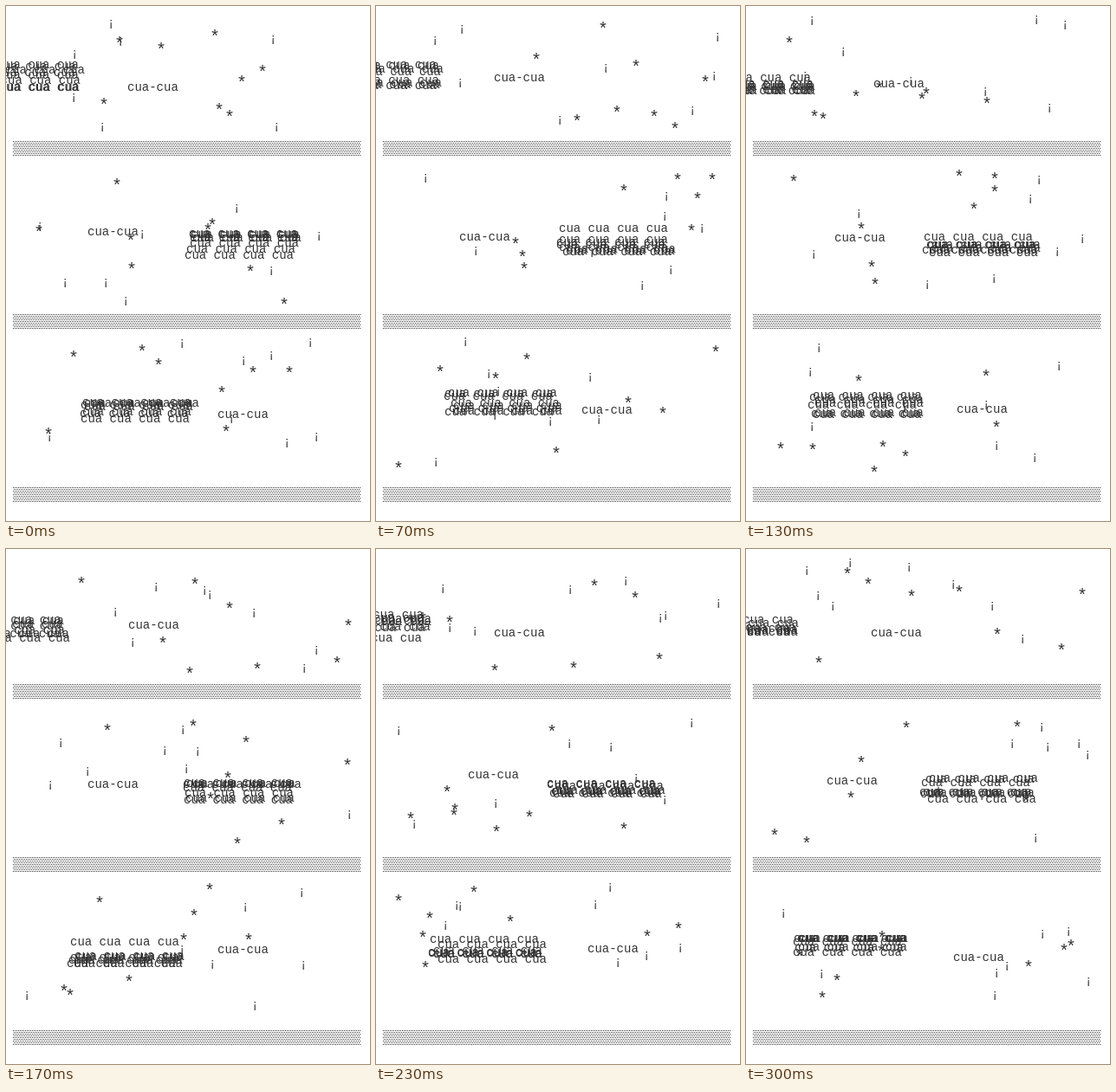
Recreate the animation shown at these times as an HTML page with a canvas. Size 420 by 595 pixels, loop 0.33 s.

```html
<!DOCTYPE html>
<html lang="ca">
<meta charset="utf-8">
<title>cua-cua</title>
<style>
  html, body { margin: 0; height: 100%; overflow: hidden; background: #fff; }
  canvas { display: block; }
</style>
<canvas width="420" height="595"></canvas>
<script>
const ctx = document.querySelector('canvas').getContext('2d');
const LOOP = 330, LANE = 200, ROWS = 8, SPARKS = 8;
const INK = '#333';

// Home of the caller and of the flock, and the flock's drift to the left per step
const LANES = [
  { callX: 134, callY: 83, flockX: -49, flockY: 66, drift: 3 },
  { callX: 92, callY: 60, flockX: 207, flockY: 53, drift: 1 },
  { callX: 231, callY: 60, flockX: 87, flockY: 45, drift: 4.5 },
];

function seeded(seed) {
  return () => {
    seed = seed + 0x6d2b79f5 | 0;
    let n = Math.imul(seed ^ seed >>> 15, seed | 1);
    n ^= n + Math.imul(n ^ n >>> 7, n | 61);
    return ((n ^ n >>> 14) >>> 0) / 2 ** 32;
  };
}

function drawLane(lane, index, step) {
  const random = seeded(step * 31 + index * 7 + 1);
  const within = (low, high) => low + random() * (high - low);
  const top = index * LANE;
  const put = (text, x, y, size = 14) => {
    ctx.font = `${size}px "Liberation Mono", monospace`;
    ctx.fillText(text, Math.round(x), Math.round(top + y));
  };

  const flockX = lane.flockX - lane.drift * step + within(-4, 4);
  const flockY = lane.flockY + within(0, 14);
  for (let row = 0; row < ROWS; row++) {
    put('cua cua cua cua', flockX + within(0, 13), flockY + within(4, 32));
  }
  put('cua-cua', lane.callX + within(0, 14), lane.callY + within(4, 18));

  const first = index ? -10 : 18;
  for (let i = 0; i < SPARKS; i++) {
    put('*', within(17, 395), within(first, 144) + 8, 20);
    put('¡', within(17, 395), within(first, 144));
  }
  drawGround(top + 156);
}

function drawGround(top) {
  for (let y = 0; y < 18; y += 2) {
    for (let x = y / 2 % 2; x < 401; x += 2) ctx.fillRect(8 + x, top + y, 1, 1);
  }
}

function draw() {
  // Ten steps per loop, each starting on a whole 10 ms tick
  const tick = Math.floor(performance.now() % LOOP / 10);
  const step = Math.floor((tick * 3 + 1) / 10);
  ctx.fillStyle = '#fff';
  ctx.fillRect(0, 0, 420, 595);
  ctx.fillStyle = INK;
  LANES.forEach((lane, index) => drawLane(lane, index, step));
  requestAnimationFrame(draw);
}
draw();
</script>
</html>
```
